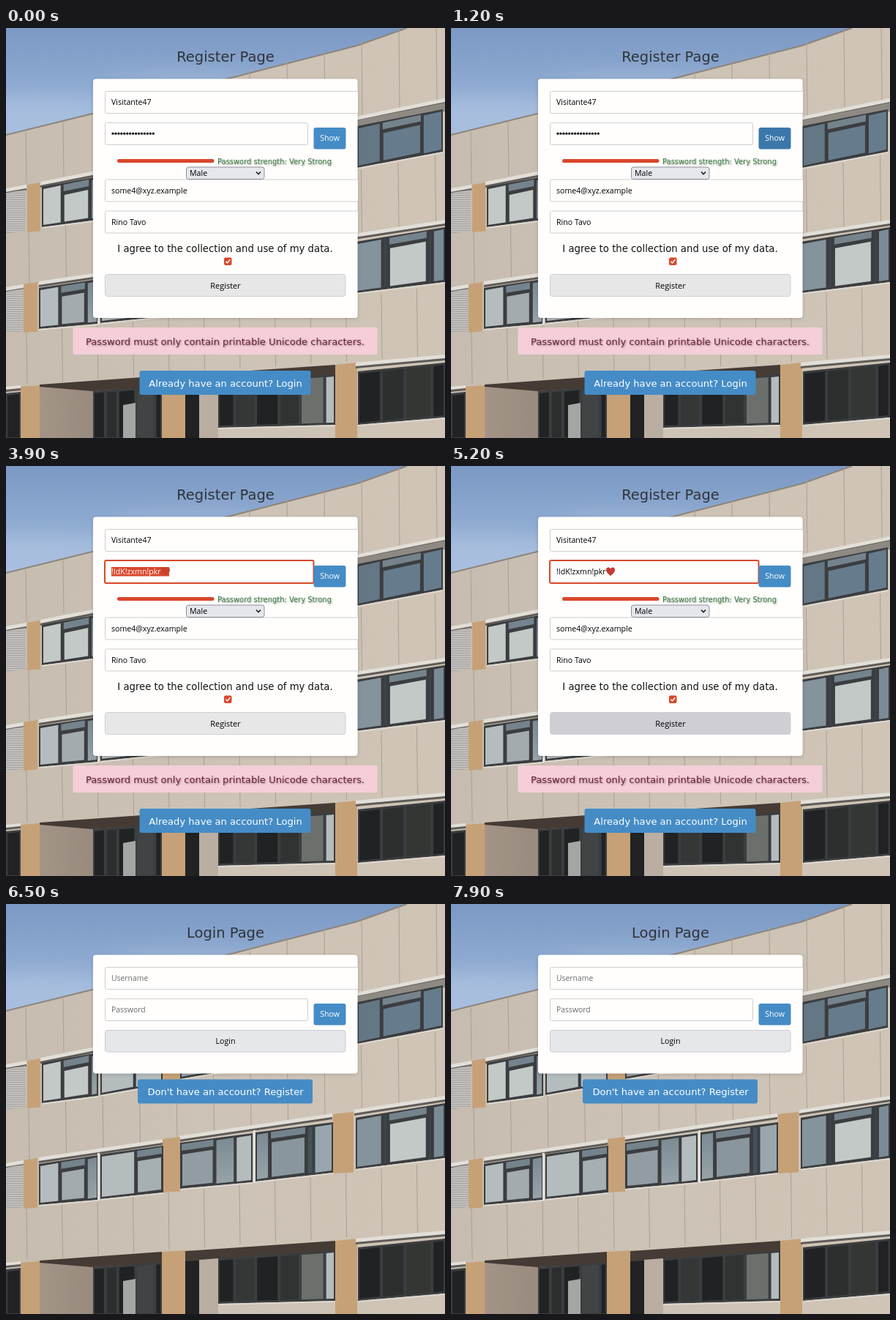
An HTML page that plays this animation: 600 by 560 pixels, repeating every 8.7 s.

```html
<!DOCTYPE html>
<html lang="en">
<head>
<meta charset="utf-8">
<title>Register and login</title>
<style>
  html, body { margin: 0; width: 600px; height: 560px; overflow: hidden; }
  svg { display: block; }
  .ui { font-family: "DejaVu Sans", sans-serif; }
  .field { font-family: "Open Sans", "Noto Sans", sans-serif; font-weight: 500; }
</style>
</head>
<body>
<svg id="stage" width="600" height="560" viewBox="0 0 600 560">
  <defs>
    <linearGradient id="sky" gradientUnits="userSpaceOnUse" x1="0" y1="0" x2="0" y2="150">
      <stop offset="0" stop-color="#7b99c4"/><stop offset=".55" stop-color="#8fabd2"/>
      <stop offset="1" stop-color="#a9c0e0"/>
    </linearGradient>
    <linearGradient id="wall" x1="0" y1="0" x2="1" y2="0">
      <stop offset="0" stop-color="#c6bcaf"/><stop offset=".5" stop-color="#cdc3b6"/>
      <stop offset="1" stop-color="#cfc4b5"/>
    </linearGradient>
    <linearGradient id="glass" x1="0" y1="0" x2="0" y2="1">
      <stop offset="0" stop-color="#7c8a92"/><stop offset="1" stop-color="#97a3a9"/>
    </linearGradient>
    <linearGradient id="recess" x1="0" y1="0" x2="1" y2="0">
      <stop offset="0" stop-color="#a39487"/><stop offset="1" stop-color="#8b7e73"/>
    </linearGradient>
    <pattern id="blind" width="8" height="3" patternUnits="userSpaceOnUse">
      <rect width="8" height="3" fill="#c2c0bd"/><rect width="8" height="1" fill="#a5a29f"/>
    </pattern>
    <filter id="soft" x="-50%" y="-100%" width="200%" height="300%"><feGaussianBlur stdDeviation="14"/></filter>
    <filter id="lift" x="-10%" y="-10%" width="120%" height="125%">
      <feDropShadow dx="0" dy="1" stdDeviation="2.5" flood-opacity=".18"/>
    </filter>
    <filter id="textShadow" x="-5%" y="-30%" width="110%" height="180%">
      <feDropShadow dx="1" dy="1" stdDeviation=".8" flood-opacity=".4"/>
    </filter>
    <clipPath id="inCard"><rect x="119" y="69" width="362" height="327"/></clipPath>
  </defs>
  <g id="scene"></g>
  <g id="register" class="ui"></g>
  <g id="login" class="ui"></g>
</svg>
<script>
const LOOP = 8700;
const RED = '#d9472b', BLUE = '#458cc6';
const $ = id => document.getElementById(id);

function add(parent, tag, attrs, content) {
  const node = document.createElementNS('http://www.w3.org/2000/svg', tag);
  for (const key in attrs) node.setAttribute(key, attrs[key]);
  if (content) node.textContent = content;
  return parent.appendChild(node);
}

// ---------- building ----------
const scene = $('scene');
const at = (a, b, k) => a + (b - a) * k;
const poly = (points, fill) => add(scene, 'polygon', { points, fill });

// Quad with vertical sides: top runs t0 to t1, bottom runs b0 to b1.
const quad = (x0, x1, t0, t1, b0, b1, fill) =>
  poly(`${x0},${t0} ${x1},${t1} ${x1},${b1} ${x0},${b0}`, fill);

function rail(x0, x1, y0, y1, h = 5) {
  quad(x0, x1, y0, y1, y0 + h, y1 + h, '#e2dfd9');
  quad(x0, x1, y0 + h, y1 + h, y0 + h + 3, y1 + h + 3, '#5f5c58');
}

// Pane with a transom light above it.
const sash = fill => ({ fill });

// Dark frame with panes split at the given fractions of its width.
function windows(x0, x1, t0, t1, b0, b1, splits, panes) {
  quad(x0, x1, t0, t1, b0, b1, '#3b3d40');
  const edges = [0, ...splits, 1];
  panes.forEach((pane, i) => {
    const l = edges[i], r = edges[i + 1], w = x1 - x0;
    const tl = at(t0, t1, l), tr = at(t0, t1, r), bl = at(b0, b1, l), br = at(b0, b1, r);
    const xl = x0 + l * w + 2, xr = x0 + r * w - 2;
    if (pane.fill) {
      quad(xl, xr, tl + 2, tr + 2, tl + 11, tr + 11, '#75838c');
      quad(xl + 1, xr - 1, tl + 16, tr + 16, bl - 4, br - 4, pane.fill);
    } else quad(xl, xr, tl + 3, tr + 3, bl - 3, br - 3, pane);
  });
  quad(x0, x1, b0, b1, b0 + 2, b1 + 2, '#ded8cf');
}

function joints(first, step, top, bottom) {
  for (let x = first; x < 600; x += step) {
    const k = x / 600;
    add(scene, 'line', { x1: x, x2: x + 1, y1: top(k), y2: bottom(k), stroke: '#aa9f93', 'stroke-width': 1 });
  }
}

const pillar = (x0, x1, top, bottom, slope = 3) =>
  quad(x0, x1, top, top - slope, bottom, bottom - slope / 2, '#c6a177');

function drawScene() {
  const G = 'url(#glass)', DARK = '#202223', PALE = '#b5bcbd', BRIGHT = '#c3c9c6', BLUEISH = '#667c8c';
  add(scene, 'rect', { width: 600, height: 560, fill: 'url(#sky)' });
  for (const [cx, cy, rx, ry] of [[40, 112, 110, 16], [250, 78, 110, 12]])
    add(scene, 'ellipse', { cx, cy, rx, ry, fill: '#cddaec', opacity: .3, filter: 'url(#soft)' });

  poly('0,146 118,117 300,70 480,24 548,0 600,0 600,560 0,560', 'url(#wall)');
  add(scene, 'polyline', { points: '0,146 118,117 300,70 480,24 548,0', fill: 'none', stroke: '#8d857c', 'stroke-width': 2 });
  joints(27, 51, k => at(149, -14, k), k => at(217, 97, k));
  joints(31, 50.5, k => at(285, 172, k), k => at(354, 264, k));
  joints(28, 48.5, k => at(419, 352, k), k => at(488, 446, k));

  // upper floor
  rail(0, 28, 219, 214); rail(47, 214, 210, 177); rail(236, 446, 172, 130); rail(478, 600, 121, 96);
  quad(0, 27, 225, 221, 281, 277, 'url(#blind)');
  pillar(29, 47, 214, 279); pillar(214, 238, 176, 245); pillar(447, 477, 130, 200);
  windows(49, 126, 217, 203, 272, 262, [.36, .86], [BRIGHT, sash(BRIGHT), G]);
  windows(129, 214, 202, 186, 261, 246, [.55], [PALE, PALE]);
  windows(238, 446, 180, 140, 239, 204, [.25, .5, .75], [G, G, G, G]);
  quad(480, 600, 126, 102, 138, 114, '#8e8a83');
  windows(480, 597, 134, 111, 191, 169, [.28, .76], ['#647784', sash(BLUEISH), BLUEISH]);

  // middle floor
  rail(0, 24, 354, 350); rail(45, 215, 346, 321); rail(236, 446, 317, 286); rail(476, 600, 281, 262);
  quad(0, 24, 360, 356, 417, 414, 'url(#blind)');
  pillar(24, 43, 350, 416); pillar(214, 238, 321, 394); pillar(447, 475, 287, 368);
  windows(45, 126, 355, 343, 411, 404, [.35, .8], [PALE, sash('#a3abae'), G]);
  windows(129, 215, 342, 330, 403, 394, [.56], [PALE, sash('#a6afb1')]);
  windows(238, 337, 326, 313, 389, 380, [.48, .76], [sash('#929da3'), G, PALE]);
  windows(341, 447, 312, 298, 379, 367, [.18, .66, .75], [G, sash('#89969e'), '#46525a', '#98a6ad']);
  windows(478, 600, 292, 272, 362, 347, [.3, .36, .81, .86], ['#84939c', '#3d444a', sash(BRIGHT), '#3d444a', '#7b8b96']);
  quad(125, 128, 340, 340, 405, 405, '#e2dfda');
  quad(338, 341, 309, 309, 381, 381, '#e2dfda');

  // ground floor
  rail(0, 20, 490, 488, 4);
  windows(0, 20, 499, 497, 562, 562, [], [DARK]);
  pillar(20, 46, 490, 562, 2);
  quad(46, 213, 489, 476, 562, 562, 'url(#recess)');
  poly('46,487 213,475 213,490 118,496 46,490', '#453b34');
  windows(119, 213, 496, 489, 562, 562, [.18, .36, .62, .9], [DARK, '#2c2d2d', DARK, '#414444', DARK]);
  quad(160, 177, 515, 512, 562, 562, '#a3a6a3');
  pillar(213, 245, 475, 562, 2);
  quad(245, 450, 474, 460, 490, 475, '#453c35');
  quad(245, 264, 488, 487, 562, 562, DARK);
  quad(264, 290, 486, 484, 562, 562, '#b9aea1');
  windows(290, 450, 484, 473, 546, 542, [.14, .32, .52, .7, .91], [DARK, '#333736', DARK, '#2f3433', '#6c706c', PALE]);
  pillar(450, 480, 460, 562, 3);
  rail(478, 600, 457, 446);
  windows(481, 600, 469, 457, 542, 532, [.27, .54, .85], [DARK, '#2b302e', '#333632', DARK]);
}

// ---------- form ----------
const text = (parent, x, y, size, fill, content, attrs = {}) =>
  add(parent, 'text', { x, y, 'font-size': size, fill, ...attrs }, content);
const fieldText = (parent, x, y, content, fill = '#000', size = 10.6, attrs = {}) =>
  text(parent, x, y, size, fill, content, { class: 'field', ...attrs });
const box = (parent, x, y, width, height, rx, fill, stroke = 'none') =>
  add(parent, 'rect', { x, y, width, height, rx, fill, stroke });
const input = (parent, y, width = 360) =>
  box(parent, 135.5, y + .5, width, 30, 2, '#fffefd', '#cfcfcf');
const mid = { 'text-anchor': 'middle' };

function card(parent, title, height) {
  text(parent, 300, 45.5, 19.5, '#30343a', title, mid);
  box(parent, 119, 69.5, 361.5, height, 4, '#fffefd').setAttribute('filter', 'url(#lift)');
  return add(parent, 'g', { 'clip-path': 'url(#inCard)' });
}

function showButton(parent) {
  const button = box(parent, 420.5, 136, 44, 29.5, 3, BLUE);
  fieldText(parent, 442.5, 154, 'Show', '#fff', 10.6, mid);
  return button;
}

function link(parent, x, y, width, label) {
  box(parent, x, y, width, 33, 3, BLUE);
  text(parent, 300, y + 21.5, 13.1, '#fff', label, mid);
}

function drawRegister(page) {
  const form = card(page, 'Register Page', 326.5);
  const ui = {};
  input(form, 86); fieldText(form, 144, 105, 'Visitante47');
  ui.password = input(form, 129, 277);
  ui.dots = add(form, 'g', { fill: '#111' });
  for (let i = 0; i < 15; i++) add(ui.dots, 'circle', { cx: 146 + i * 3.95, cy: 144.2, r: 1.6 });
  ui.plain = add(form, 'g', {});
  ui.selection = box(ui.plain, 144, 138, 79, 12.5, 0, RED);
  ui.secret = fieldText(ui.plain, 144, 148, '!IdK!zxmn!pkr');
  ui.heart = add(ui.plain, 'path', {
    d: 'M218 150C214 147 212 144.500 212 142C212 138 216.500 137.500 218 140.500C219.500 137.500 224 138 224 142C224 144.500 222 147 218 150Z'
  });
  ui.show = showButton(form);

  box(form, 152, 179, 132.5, 5, 2.5, RED);
  text(form, 289, 186, 9.95, '#38793f', 'Password strength: Very Strong', { filter: 'url(#textShadow)' });
  input(form, 206.5); fieldText(form, 144, 226, 'some4@xyz.example');
  box(form, 246.5, 190, 106.5, 16.5, 3, '#e6e7ec', '#8d8d99');
  fieldText(form, 251, 202, 'Male');
  add(form, 'path', { d: 'M342 196.500L345 199.700L348 196.500', fill: 'none', stroke: '#111', 'stroke-width': 1.5 });
  input(form, 249.5); fieldText(form, 144, 269, 'Rino Tavo');
  text(form, 299.5, 306, 13.25, '#111', 'I agree to the collection and use of my data.', mid);
  box(form, 298, 313.5, 10.5, 10.5, 2, RED);
  add(form, 'path', { d: 'M300.300 318.800L302.500 321L306.300 316.300', fill: 'none', stroke: '#fff', 'stroke-width': 1.5 });
  ui.submit = box(form, 135.5, 336.5, 328.5, 30, 3, '#e7e7e7', '#d0d0d0');
  fieldText(form, 300, 356, 'Register', '#000', 11, mid);

  box(page, 91.5, 409, 416, 37, 2, '#f5ced8');
  text(page, 299.5, 433, 13.1, '#6a2336', 'Password must only contain printable Unicode characters.',
    { ...mid, filter: 'url(#textShadow)' });
  link(page, 182.5, 468, 234, 'Already have an account? Login');
  return ui;
}

function drawLogin(page) {
  const form = card(page, 'Login Page', 162);
  input(form, 86); fieldText(form, 144, 105, 'Username', '#6c6c6c', 10.4);
  input(form, 129, 277); fieldText(form, 144, 148, 'Password', '#6c6c6c', 10.4);
  showButton(form);
  box(form, 135.5, 172.5, 328.5, 29.5, 3, '#e5e7ea', '#c9cbce');
  fieldText(form, 300, 191, 'Login', '#000', 10.6, mid);
  link(page, 180, 239.5, 239, "Don't have an account? Register");
}

// ---------- timeline ----------
const set = (node, attrs) => { for (const key in attrs) node.setAttribute(key, attrs[key]); };
const visible = (node, on) => node.setAttribute('display', on ? 'inline' : 'none');
const within = (t, from, to) => t >= from && t < to;
// Progress that advances in equal 100 ms steps.
const stepped = (t, from, steps) => Math.min(1, Math.max(0, (Math.floor((t - from) / 100) + 1) / steps));
const mix = (a, b, k) => `rgb(${a.map((v, i) => Math.round(at(v, b[i], k)))})`;

function render(t) {
  const loggedOut = t < 6500;
  visible($('register'), loggedOut);
  visible($('login'), !loggedOut);
  if (!loggedOut) return;

  const revealed = t >= 1900;
  const focused = within(t, 3100, 5700);
  const selecting = within(t, 3100, 4100);
  visible(ui.dots, !revealed);
  visible(ui.plain, revealed);
  visible(ui.selection, selecting);
  set(ui.password, {
    x: focused ? 135 : 135.5, y: focused ? 129 : 129.5,
    width: revealed ? 285.5 : 277, height: focused ? 31 : 30,
    stroke: focused ? RED : '#cfcfcf', 'stroke-width': focused ? 2 : 1
  });

  const picked = stepped(t, 3100, 6);
  set(ui.selection, { x: 223 - 79 * picked, width: 79 * picked });
  set(ui.secret, { fill: selecting && picked > .6 ? '#fff' : '#000' });
  set(ui.heart, { fill: selecting ? '#c9402b' : '#c43a32' });

  set(ui.show, {
    fill: t < 2400 ? mix([69, 140, 198], [60, 119, 170], stepped(t, 300, 2)) : BLUE
  });
  const hover = stepped(t, 4500, 6);
  set(ui.submit, {
    fill: within(t, 5700, 5800) ? '#c0bfc6' : mix([231, 231, 231], [207, 206, 212], hover),
    stroke: mix([208, 208, 208], [207, 206, 212], hover)
  });
}

drawScene();
const ui = drawRegister($('register'));
drawLogin($('login'));

function tick() {
  render(performance.now() % LOOP);
  requestAnimationFrame(tick);
}
tick();
</script>
</body>
</html>
```
